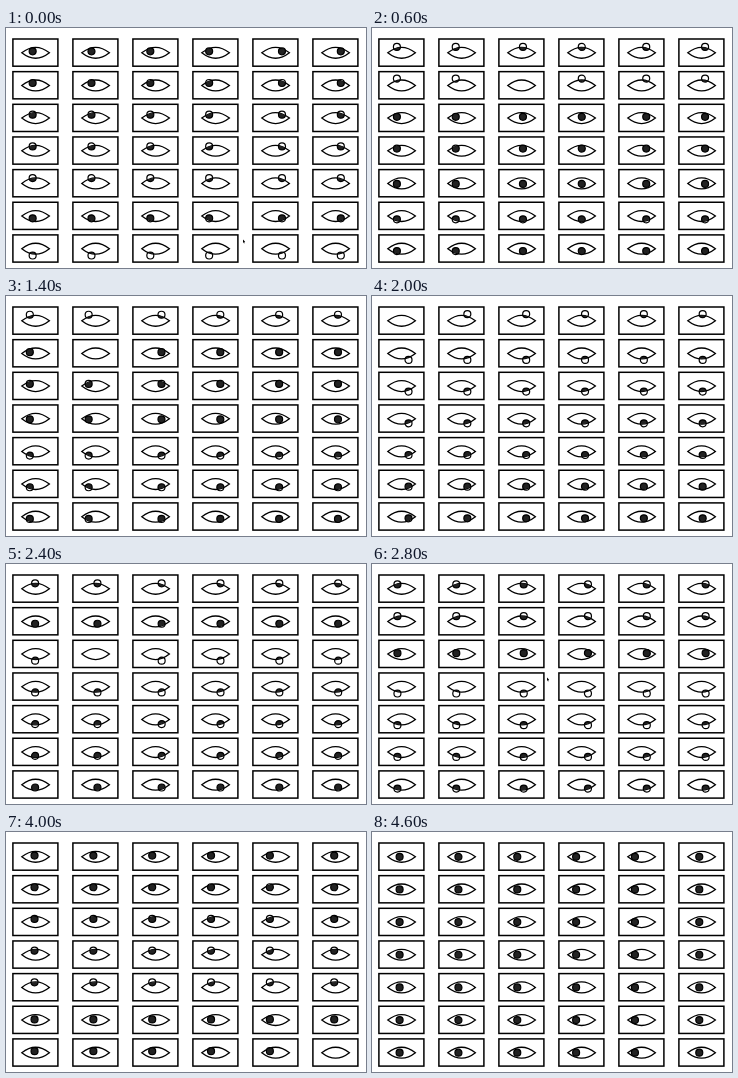
Animation, 360 px wide and 240 px high, one loop 4.8 s. Source, as an HTML page with a canvas:

```html
<!DOCTYPE html>
<html>
<head>
<meta charset="utf-8">
<style>
html, body { margin: 0; width: 100%; height: 100%; overflow: hidden; background: #fff; }
canvas { display: block; width: 360px; height: 240px; }
</style>
</head>
<body>
<canvas id="stage" width="360" height="240"></canvas>
<script>
const WIDTH = 360, HEIGHT = 240;
const STEP = 200, STEPS = 24;
const REACH = 7, TURN = .35;
const cols = Array.from({ length: 6 }, (_, i) => 29.6 + 60 * i);
const rows = Array.from({ length: 7 }, (_, i) => 24.8 + 32.65 * i);

// Pointer route as [step, x, y]; it has left the stage when y is null.
const route = [
  [0, 238, 213], [1, 212, 187], [2, 95, 150], [3, 148, 62], [4, 205, 150],
  [5, 92, 150], [7, 92, 57], [8, 15, 32], [10, 25, 38], [14, 176, 115],
  [18, 285, 180], [19, 335, 222], [22, 335, 222], [23, 287, null]
];

function pointerAt(step) {
  const i = route.findLastIndex(point => point[0] <= step);
  const [s0, x0, y0] = route[i];
  if (s0 === step) return { x: x0, y: y0 };
  const [s1, x1, y1] = route[i + 1];
  const u = (step - s0) / (s1 - s0);
  return { x: x0 + (x1 - x0) * u, y: y0 + (y1 - y0) * u };
}

// Pupils lean away from the pointer, most strongly nearby.
function lean(center, pointer, size) {
  if (pointer === null) return 0;
  const d = center - pointer;
  return (d < 0 ? -1 : 1) * REACH * (1 - Math.abs(d) / size);
}

// A pupil that has to change sides turns gradually.
function follow(offsets, centers, pointer, size) {
  return offsets.map((offset, i) => {
    const goal = lean(centers[i], pointer, size);
    return offset * goal < 0 ? offset + (goal - offset) * TURN : goal;
  });
}

let xs = cols.map(c => lean(c, 240, WIDTH));
let ys = rows.map(c => lean(c, 183, HEIGHT));
const poses = Array.from({ length: STEPS }, (_, step) => {
  const pointer = pointerAt(step);
  xs = follow(xs, cols, pointer.x, WIDTH);
  ys = follow(ys, rows, pointer.y, HEIGHT);
  return { xs, ys, pointer };
});

const ctx = document.getElementById('stage').getContext('2d');
const lids = new Path2D('M-13.8 0Q0 -10.9 13.8 0Q0 10.9 -13.8 0Z');
const arrow = new Path2D('M-1 -1.5l2.2 2.2l-1 .2l.5 1.2l-.7 .3l-.5 -1.2l-.5 .5z');

function drawEye(dx, dy, hovered) {
  ctx.strokeStyle = '#000';
  ctx.lineWidth = 1.5;
  ctx.strokeRect(-22.7, -13.8, 45, 27.2);
  ctx.lineWidth = 1.3;
  ctx.stroke(lids);
  if (hovered) return;
  const pupil = new Path2D();
  pupil.arc(dx, dy, 3.5, 0, 2 * Math.PI);
  ctx.save();
  ctx.clip(lids);
  ctx.fillStyle = '#222';
  ctx.fill(pupil);
  ctx.restore();
  ctx.lineWidth = 1.2;
  ctx.stroke(pupil);
}

function at(x, y, paint) {
  ctx.save();
  ctx.translate(x, y);
  paint();
  ctx.restore();
}

function draw(step) {
  const { xs, ys, pointer } = poses[step];
  let visible = pointer.y !== null;
  ctx.fillStyle = '#fff';
  ctx.fillRect(0, 0, WIDTH, HEIGHT);
  rows.forEach((y, r) => cols.forEach((x, c) => {
    const hovered = pointer.y !== null && Math.abs(pointer.x - x) < 23 && Math.abs(pointer.y - y) < 14;
    if (hovered) visible = false;
    at(x, y, () => drawEye(xs[c], ys[r], hovered));
  }));
  if (!visible) return;
  ctx.fillStyle = '#000';
  at(pointer.x, pointer.y, () => ctx.fill(arrow));
}

const start = performance.now();
function tick() {
  const t = Math.max(0, performance.now() - start);
  draw(Math.floor(t / STEP) % STEPS);
  requestAnimationFrame(tick);
}
tick();
</script>
</body>
</html>
```
